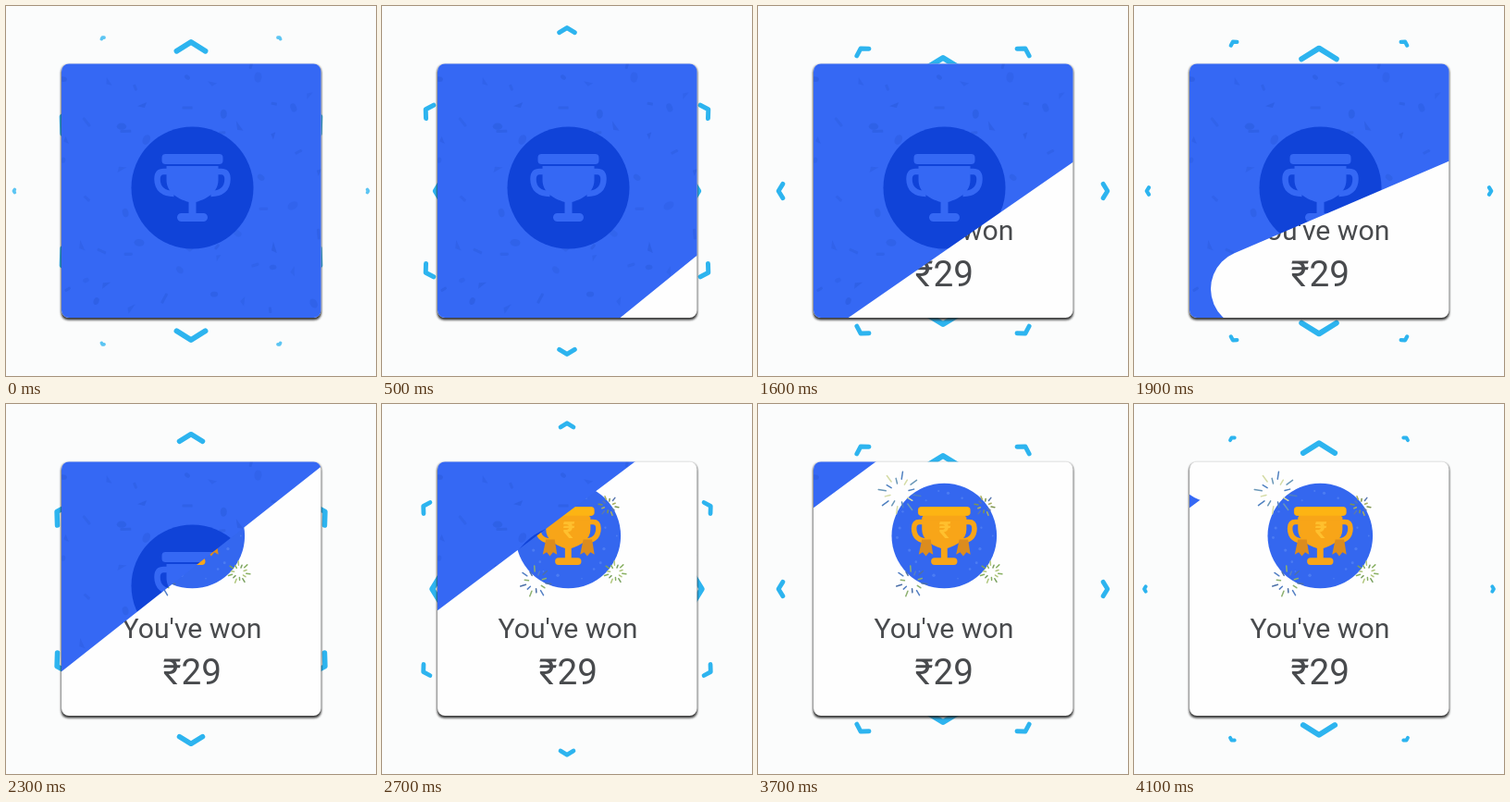
Write an HTML page that moves like this. It is 400x400 px and loops after 4.2 s.

```html
<!DOCTYPE html>
<html lang="en">
<head>
<meta charset="utf-8">
<title>Scratch card</title>
<style>
html, body { margin: 0; width: 100%; height: 100%; overflow: hidden; background: #fbfcfc; }
svg { display: block; width: 100vw; height: 100vh; }
text { font-family: Roboto, sans-serif; fill: #484a4d; text-anchor: middle; }
</style>
</head>
<body>
<svg viewBox="0 0 400 400">
  <defs>
    <clipPath id="card"><rect x="60" y="62.5" width="280.5" height="274.5" rx="8"/></clipPath>
    <filter id="soft" x="-10%" y="-10%" width="120%" height="120%"><feGaussianBlur stdDeviation="1.2"/></filter>
    <mask id="left" maskUnits="userSpaceOnUse" x="0" y="0" width="400" height="400">
      <rect width="400" height="400" fill="#fff"/>
      <path id="scratch" fill="none" stroke="#000" stroke-width="84" stroke-linecap="round" stroke-linejoin="round"/>
    </mask>
    <g id="cup">
      <rect id="rim" x="-33" y="-37" width="66" height="11" rx="4"/>
      <path d="M-28-24H28V-9C28 4 17 11 4 15V27H12a4.5 4.5 0 0 1 0 9H-12a4.5 4.5 0 0 1 0-9H-4V15C-17 11-28 4-28-9Z"/>
      <path id="ear" d="M-27-18H-31Q-38-18-38-10C-38 1-31 6-20 6" fill="none" stroke="currentColor" stroke-width="6.5"/>
      <use href="#ear" transform="scale(-1 1)"/>
    </g>
    <path id="ribbon" d="M-5-10H6L9 9 4 6 0 11-4 6-9 9Z" fill="#dc8c1e"/>
  </defs>
  <g id="rays" fill="none" stroke="#2db4ef" stroke-linecap="round" stroke-linejoin="round"></g>
  <rect x="59.5" y="63.5" width="281.5" height="276" rx="8" fill="#222" opacity=".9" filter="url(#soft)"/>
  <rect x="60" y="62.5" width="280.5" height="274.5" rx="8" fill="#fefefe"/>
  <circle cx="201.3" cy="142.5" r="56.8" fill="#3467ef"/>
  <g id="dots" fill="#5b8af5"></g>
  <g id="sparks" stroke-width="1.5" stroke-linecap="round"></g>
  <g transform="translate(201.3 143) scale(.86)" fill="#f8a518" color="#f8a518">
    <use href="#cup"/>
    <rect x="-27" y="-28" width="54" height="8"/>
    <use href="#rim" transform="scale(.97 1)" fill="#fdb413"/>
    <use href="#ribbon" x="-23" y="14"/>
    <use href="#ribbon" x="24" y="14"/>
  </g>
  <text x="202" y="145" font-size="25" font-weight="700" style="fill:#ffc02e">₹</text>
  <text x="201" y="253" font-size="30.2">You've won</text>
  <text x="201.3" y="303" font-size="38.7">₹29</text>
  <g clip-path="url(#card)">
    <g mask="url(#left)">
      <rect x="58" y="60" width="285" height="280" fill="#3568f4"/>
      <g id="bits" fill="#2d5ee2"></g>
      <circle cx="201.5" cy="196.5" r="66" fill="#1043d8"/>
      <use href="#cup" transform="translate(201.5 197)" fill="#3568f4" color="#3568f4"/>
    </g>
  </g>
</svg>
<script>
const LOOP = 4200, STEP = 100, RAY_LOOP = 21;
const $ = id => document.getElementById(id);

function add(parent, tag, attrs) {
  const el = document.createElementNS('http://www.w3.org/2000/svg', tag);
  for (const k in attrs) el.setAttribute(k, attrs[k]);
  return parent.appendChild(el);
}

let seed = 11;
const rnd = () => (seed = seed * 16807 % 2147483647) / 2147483647;

// Confetti on the cover: one piece in each cell of a loose grid
for (let i = 0; i < 64; i++) {
  const x = 62 + 35 * (i % 8 + rnd()), y = 64 + 34 * (Math.floor(i / 8) + rnd());
  const n = 3 + rnd() * 3;
  const pose = { transform: `translate(${x} ${y}) rotate(${rnd() * 180})`, opacity: 0.4 + rnd() * 0.4 };
  if (i % 3 === 0) add($('bits'), 'ellipse', { rx: n, ry: n * 0.7, ...pose });
  else if (i % 3 === 1) add($('bits'), 'path', { d: `M${-n} 2L${n}-3 ${n * 0.6} 3Z`, ...pose });
  else add($('bits'), 'rect', { x: -n, y: -1.5, width: 2 * n, height: 3, rx: 1, ...pose });
}

// Specks on the prize disc
for (let i = 0; i < 18; i++) {
  const a = i * 2.4, r = 40 + rnd() * 13;
  add($('dots'), 'circle', { cx: 201.5 + r * Math.cos(a), cy: 142.5 + r * Math.sin(a), r: 0.8 + rnd(), opacity: 0.6 });
}

// Firework: alternate long outer and short inner rays
function burst(x, y, r, n, ...colors) {
  for (let i = 0; i < n; i++) {
    const a = i * 2 * Math.PI / n + 0.15, c = Math.cos(a), s = Math.sin(a);
    const p = i % 2 ? 0.45 : 0.65, q = i % 2 ? 0.7 : 1;
    add($('sparks'), 'line', {
      x1: x + r * p * c, y1: y + r * p * s, x2: x + r * q * c, y2: y + r * q * s,
      stroke: colors[i % colors.length]
    });
  }
}
burst(153, 96, 23, 16, '#4f80c0', '#d5dca6', '#6b98b8');
burst(245, 110, 11, 12, '#7f9550', '#5a78b0', '#a9b060');
burst(166, 192, 17, 14, '#4c70a8', '#8db070', '#5580c4');
burst(252, 182, 12, 14, '#88b062', '#b0c67c', '#7aa060');

// Chevrons every 30 degrees, alternate ones half a cycle apart
const rays = Array.from({ length: 12 }, (_, i) => ({
  el: add($('rays'), 'path', { transform: `translate(200 200) rotate(${i * 30})` }),
  start: i % 2 ? 16 : 5.5
}));

function drawRay({ el, start }, t) {
  let u = ((t / 100 - start) % RAY_LOOP + RAY_LOOP) % RAY_LOOP;
  if (u > 17) u -= RAY_LOOP;
  const r = 147 + 3.55 * u - 0.036 * u * u;
  const w = Math.max(2.5, 1.02 * (200 - r));
  const s = 6 * Math.min(1, Math.pow(w / 42, 0.28));
  const h = Math.max(0.1, (w - s) / 2), tip = r - s / 2, back = tip - h * 0.62;
  el.setAttribute('d', `M${back} ${-h}L${tip} 0 ${back} ${h}`);
  el.setAttribute('stroke-width', s);
  el.setAttribute('opacity', Math.max(0, Math.min(1, (198 - r) / 6)));
}

// Scratching turns, right and left by turns: time, level = y + SLOPE * x of the upper edge
const SLOPE = 0.75;
const turns = [[150, 580], [350, 530], [500, 525], [720, 472], [900, 477], [1230, 410], [1600, 424],
  [1950, 334], [2300, 323], [2500, 268], [2700, 267], [2950, 208], [3080, 239], [3370, 157], [3600, 160], [3850, 75]];

// The brush centre lies to the lower right of the edge it leaves
const path = turns.map(([time, level], i) => {
  const x = i % 2 ? Math.max(60, (level - 337) / SLOPE) : 340;
  return { time, x: x + 25, y: level - SLOPE * x + 34 };
});

function drawScratch(t) {
  const done = path.filter(p => p.time <= t), a = done[done.length - 1], b = path[done.length];
  const pts = done.map(p => [p.x, p.y]);
  if (a && b) {
    const k = (t - a.time) / (b.time - a.time);
    pts.push([a.x + (b.x - a.x) * k, a.y + (b.y - a.y) * k]);
  }
  $('scratch').setAttribute('d', pts.length ? 'M' + pts.join('L') : '');
}

function draw(ms) {
  const t = Math.floor(ms % LOOP / STEP) * STEP;
  rays.forEach(ray => drawRay(ray, t));
  drawScratch(t);
}

const begin = performance.now();
function tick() {
  draw(performance.now() - begin);
  requestAnimationFrame(tick);
}
tick();
</script>
</body>
</html>
```
